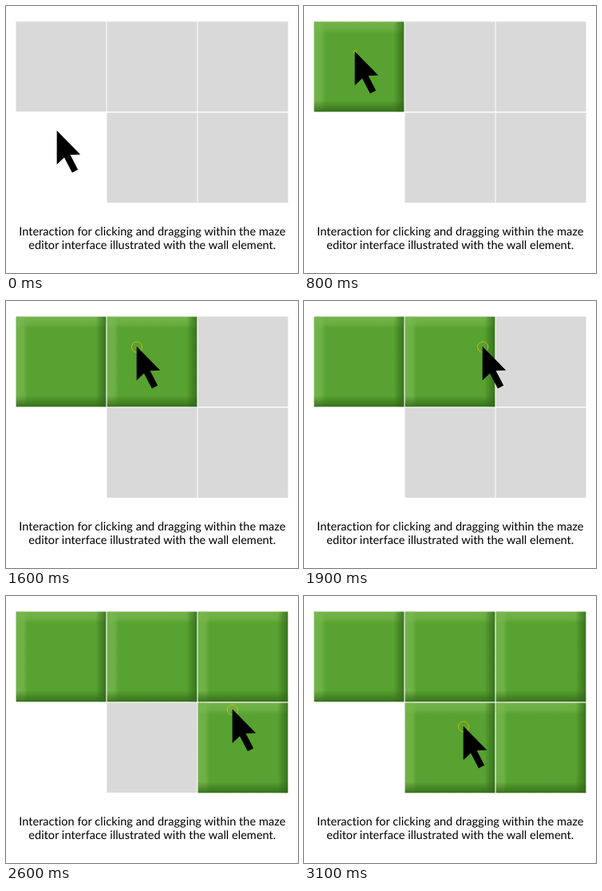
An HTML page that plays this animation: 366 by 334 pixels, repeating every 3400 ms.

```html
<!DOCTYPE html>
<html lang="en">
<head>
<meta charset="utf-8">
<title>Click and drag</title>
<style>
  html, body { margin: 0; width: 100%; height: 100%; overflow: hidden; background: #fff; }
  svg { display: block; width: 366px; height: 334px; }
  text {
    font: 14.6px Lato, sans-serif;
    font-variant-ligatures: none;
    text-rendering: geometricPrecision;
    text-anchor: middle;
  }
</style>
</head>
<body>
<svg viewBox="0 0 366 334">
  <defs>
    <linearGradient id="left">
      <stop offset="0" stop-color="#7ab850" stop-opacity=".75"/>
      <stop offset=".6" stop-color="#7ab850" stop-opacity=".65"/>
      <stop offset="1" stop-color="#7ab850" stop-opacity="0"/>
    </linearGradient>
    <linearGradient id="top" x2="0" y2="1">
      <stop offset="0" stop-color="#7ab850" stop-opacity=".8"/>
      <stop offset=".6" stop-color="#7ab850" stop-opacity=".55"/>
      <stop offset="1" stop-color="#7ab850" stop-opacity="0"/>
    </linearGradient>
    <linearGradient id="right">
      <stop offset="0" stop-color="#2f6417" stop-opacity="0"/>
      <stop offset=".5" stop-color="#2f6417" stop-opacity=".4"/>
      <stop offset="1" stop-color="#2f6417" stop-opacity=".75"/>
    </linearGradient>
    <linearGradient id="bottom" x2="0" y2="1">
      <stop offset="0" stop-color="#2f6417" stop-opacity="0"/>
      <stop offset=".5" stop-color="#2f6417" stop-opacity=".4"/>
      <stop offset="1" stop-color="#2f6417" stop-opacity=".8"/>
    </linearGradient>
    <rect id="floor" width="113" height="112.6" fill="#d9d9d9"/>
    <g id="wall">
      <use href="#floor"/>
      <g transform="translate(.3 .3)">
        <rect width="112.4" height="112.4" fill="#57a230"/>
        <rect width="14.5" height="112.4" fill="url(#left)"/>
        <rect width="112.4" height="14.5" fill="url(#top)"/>
        <rect x="99.4" width="13" height="112.4" fill="url(#right)"/>
        <rect y="98.4" width="112.4" height="14" fill="url(#bottom)"/>
      </g>
    </g>
  </defs>
  <g id="tiles"></g>
  <g id="pointer">
    <circle id="ring" cy="-.5" fill="none" stroke="#ccb913"/>
    <path d="M-.3 -1.2V41.2L9 32.4L18.9 51.4L26.2 47.7L16.6 29.2L29.2 28.8Z"/>
  </g>
  <text x="183.3" y="287">Interaction for clicking and dragging within the maze</text>
  <text x="183.3" y="304">editor interface illustrated with the wall element.</text>
</svg>
<script>
  const LOOP = 3400, STEP = 100;
  // Column, row and the time at which the tile becomes a wall
  const cells = [[0, 0, 800], [1, 0, 1500], [2, 0, 2000], [2, 1, 2600], [1, 1, 3000]];
  // Time, x, y of the pointer tip
  const path = [
    [0, 64, 157], [200, 64, 157], [700, 64, 58], [1100, 64, 58],
    [2200, 284, 58], [2700, 284, 164], [3100, 200, 164], [LOOP, 200, 164]
  ];
  const $ = id => document.getElementById(id);
  const pointer = $('pointer'), ring = $('ring');

  const tiles = cells.map(([col, row, on]) => {
    const el = document.createElementNS('http://www.w3.org/2000/svg', 'use');
    el.setAttribute('x', 12.5 + col * 114);
    el.setAttribute('y', 19.5 + row * 114);
    $('tiles').append(el);
    return { el, on };
  });

  function tipAt(t) {
    const i = path.findIndex(p => p[0] > t);
    const [t0, x0, y0] = path[i - 1], [t1, x1, y1] = path[i];
    const k = (t - t0) / (t1 - t0);
    return [x0 + (x1 - x0) * k, y0 + (y1 - y0) * k];
  }

  function draw(now) {
    const t = Math.floor((now % LOOP) / STEP) * STEP;
    for (const { el, on } of tiles) el.setAttribute('href', t >= on ? '#wall' : '#floor');
    pointer.setAttribute('transform', `translate(${tipAt(t)})`);
    const grow = Math.min(1, Math.max(0, (t - 700) / 400));
    ring.setAttribute('r', 6.6 * grow);
    ring.style.display = grow ? '' : 'none';
  }

  const start = performance.now();
  function tick() {
    draw(performance.now() - start);
    requestAnimationFrame(tick);
  }
  tick();
</script>
</body>
</html>
```
